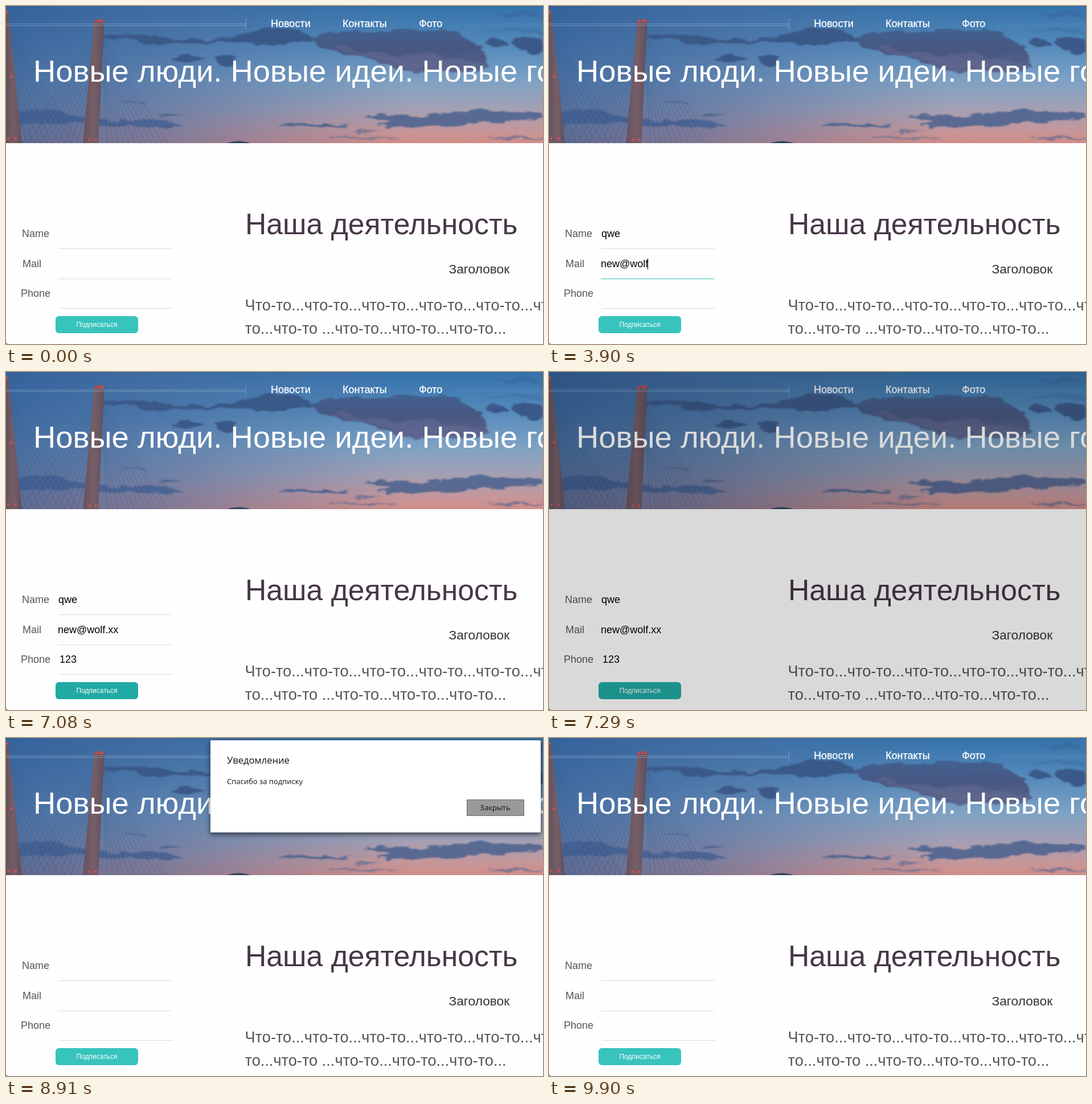
Animation of 943x594 px, one loop 9.93 s. Source, as an HTML page:

```html
<!DOCTYPE html>
<html lang="ru">
<head>
<meta charset="utf-8">
<title>Подписка</title>
<style>
  html, body { margin: 0; width: 100%; height: 100%; overflow: hidden; background: #fefefe; }
  svg { display: block; }
  text { font-family: "Liberation Sans", Arial, sans-serif; white-space: pre; }
  .nav { font-size: 18px; fill: #fff; stroke: #fff; stroke-width: .3; }
  .form { font-size: 18px; fill: #555; }
  .form .value { fill: #000; }
  .copy { font-size: 27.2px; fill: #555; }
  #dialog text { font-family: "Open Sans", "Noto Sans", sans-serif; font-size: 13px; fill: #111; }
  #dialog .title { font-size: 16.6px; }
</style>
</head>
<body>
<svg width="943" height="594" viewBox="0 0 943 594">
  <defs>
    <linearGradient id="sky" x2="0" y2="1">
      <stop offset="0" stop-color="#3472ab"/>
      <stop offset=".3" stop-color="#568bbc"/>
      <stop offset=".55" stop-color="#7fa2c4"/>
      <stop offset=".75" stop-color="#a3a0b4"/>
      <stop offset=".9" stop-color="#c4979c"/>
      <stop offset="1" stop-color="#d28d86"/>
    </linearGradient>
    <linearGradient id="dusk">
      <stop offset="0" stop-color="#345d95" stop-opacity=".75"/>
      <stop offset=".3" stop-color="#45679b" stop-opacity=".55"/>
      <stop offset=".75" stop-color="#506f9f" stop-opacity="0"/>
    </linearGradient>
    <linearGradient id="mass" x2="0" y2="1">
      <stop offset="0" stop-color="#42608f"/>
      <stop offset=".5" stop-color="#475781"/>
      <stop offset="1" stop-color="#5d678f"/>
    </linearGradient>
    <linearGradient id="stone">
      <stop offset="0" stop-color="#65525f"/>
      <stop offset=".5" stop-color="#765e66"/>
      <stop offset="1" stop-color="#5d4f5f"/>
    </linearGradient>
    <filter id="ragged" filterUnits="userSpaceOnUse" x="0" y="0" width="943" height="241" color-interpolation-filters="sRGB">
      <feTurbulence type="fractalNoise" baseFrequency=".03 .08" numOctaves="4" seed="5"/>
      <feDisplacementMap in="SourceGraphic" scale="15" xChannelSelector="R" yChannelSelector="G"/>
      <feGaussianBlur stdDeviation="1.8 1.2"/>
    </filter>
    <filter id="shadow" x="-10%" y="-10%" width="120%" height="130%">
      <feDropShadow dx="0" dy="3" stdDeviation="5" flood-opacity=".65"/>
    </filter>
    <clipPath id="banner"><rect width="943" height="241"/></clipPath>
  </defs>

  <rect width="943" height="594" fill="#fefefe"/>

  <g clip-path="url(#banner)">
    <rect width="943" height="241" fill="url(#sky)"/>
    <rect width="943" height="241" fill="url(#dusk)"/>
    <g filter="url(#ragged)">
      <g fill="#3b5988">
        <path d="M170 53Q220 47 280 55T370 57Q410 48 440 42T500 40Q530 48 545 60Q500 70 440 66T300 68Q220 64 170 53Z"/>
        <path d="M288 92Q318 81 346 92Q320 100 288 92ZM364 91Q382 79 402 89Q404 102 388 105Q372 102 364 91Z"/>
        <path d="M840 65Q858 51 882 66Q864 78 840 65ZM886 62Q914 49 943 57V82Q914 90 886 62Z"/>
        <path d="M860 12Q900 8 943 16V21Q900 20 860 12ZM840 42Q890 38 943 45V48Q890 48 840 42Z" opacity=".3"/>
      </g>
      <path fill="url(#mass)" d="M535 58Q550 42 580 48Q610 36 645 46Q690 36 730 43Q795 38 816 62Q848 78 846 98Q856 110 838 112Q790 118 740 115Q700 120 672 104Q640 92 610 86Q565 84 535 58Z"/>
      <path fill="#6b6e93" opacity=".4" d="M570 74Q600 66 625 82Q660 72 690 88Q740 76 768 94Q800 88 836 108Q760 106 700 106Q650 92 570 74Z"/>
      <g fill="#4f648f">
        <path d="M20 186Q70 178 130 191T250 200Q290 203 312 210Q250 216 170 209T20 211Z" fill="#3d5d91" opacity=".75"/>
        <path d="M200 169Q225 166 253 170Q225 173 200 169ZM264 192Q285 189 308 193Q285 196 264 192Z"/>
        <path d="M478 208Q520 202 570 208T640 207Q615 213 560 212T478 208Z"/>
        <path d="M625 194Q665 187 710 193Q760 191 800 185Q840 179 880 186Q920 188 943 187V198Q900 203 850 204Q790 213 730 211Q690 216 650 210Q700 202 625 194Z" opacity=".9"/>
        <path d="M558 231Q620 227 692 232Q620 235 558 231ZM600 221Q632 218 662 222Q630 225 600 221ZM840 232Q890 228 943 231V234Q890 236 840 232Z" opacity=".6"/>
      </g>
    </g>
    <path d="M388 241Q408 234 430 241Z" fill="#33415f"/>
    <g id="cables" stroke="#293a63" stroke-opacity=".3" stroke-width=".8"></g>
    <path d="M0 8H4L28 241H0Z" fill="url(#stone)"/>
    <path d="M155 26H173L162 241H135Z" fill="url(#stone)"/>
    <path d="M154 26Q164 20 174 26V31H154Z" fill="#6c5666"/>
    <g id="lamps" fill="#ff4a55"></g>
    <g stroke="#c9dcf0" fill="none">
      <path d="M0 31.5H421M0 34.5H421M421.5 23V41" stroke-opacity=".38"/>
      <path d="M792.5 23V41M793 31.5H943M793 34.5H943" stroke-opacity=".1"/>
    </g>
    <g class="nav">
      <text x="465" y="37">Новости</text>
      <text x="591" y="37">Контакты</text>
      <text x="725" y="37">Фото</text>
    </g>
    <text x="48" y="133" font-size="54.4" fill="#fff">Новые люди. Новые идеи. Новые города</text>
  </g>

  <text x="420" y="400.5" font-size="51.7" fill="#463746">Наша деятельность</text>
  <text x="777.5" y="470" font-size="22.7" fill="#333">Заголовок</text>
  <g class="copy">
    <text x="419.5" y="535">Что-то...что-то...что-то...что-то...что-то...что-то...</text>
    <text x="419.5" y="576">то...что-то ...что-то...что-то...что-то...</text>
  </g>

  <g class="form" id="form"></g>
  <rect id="submit" x="87" y="545" width="145" height="30" rx="6"/>
  <text x="123.5" y="564" font-size="12" fill="#fff">Подписаться</text>
  <path d="M0 590Q1 593 4 594H0Z" fill="#999"/>

  <rect id="dim" width="943" height="594"/>

  <g id="dialog">
    <rect x="359" y="4" width="580" height="162" rx="2" fill="#fff" filter="url(#shadow)"/>
    <text class="title" x="388" y="45">Уведомление</text>
    <text x="388" y="81">Спасибо за подписку</text>
    <rect id="close" x="809.5" y="108.5" width="100" height="28" stroke="#111" stroke-dasharray="1 1"/>
    <text x="859" y="127" text-anchor="middle">Закрыть</text>
  </g>
</svg>

<script>
const LOOP = 9930, RESET = 8850, DIM_START = 7290;
const TEAL = '#38c3bd';
const $ = id => document.getElementById(id);

function add(parent, tag, attrs, text = '') {
  const node = document.createElementNS(parent.namespaceURI, tag);
  for (const key in attrs) node.setAttribute(key, attrs[key]);
  node.textContent = text;
  return parent.appendChild(node);
}

// Bridge stays fan out from each pylon.
function fan(count, fromX, topY, stepY, nearX, farX) {
  for (let i = 0; i < count; i++) {
    const x2 = farX + (nearX - farX) * i / (count - 1);
    add($('cables'), 'line', { x1: fromX, y1: topY + i * stepY, x2, y2: 241 });
  }
}
fan(12, 171, 56, 7, 178, 284);
fan(10, 155, 52, 8, 125, 28);
fan(9, 5, 42, 10, 36, 128);

for (const [cx, cy] of [[158, 27], [164, 25], [169, 27], [147, 235], [158, 235], [4, 233], [17, 233], [9, 124], [1, 10], [163, 132]]) {
  add($('lamps'), 'circle', { cx, cy, r: 3, opacity: .25 });
  add($('lamps'), 'circle', { cx, cy, r: 1.3 });
}

const fields = [
  { label: 'Name', labelX: 28, x: 92, y: 406, lineX: 92, lineEnd: 291, lineY: 426, value: 'qwe',
    keys: [1170, 1290, 1380], focus: [480, 1950], blinks: [[1020, 1170], [1890, 1950]] },
  { label: 'Mail', labelX: 29, x: 91, y: 459, lineX: 91, lineEnd: 290, lineY: 479, value: 'new@wolf.xx',
    keys: [2250, 2340, 2400, 2910, 3540, 3630, 3720, 3900, 4080, 4320, 4410],
    focus: [1950, 4830], blinks: [[3450, 3540]] },
  { label: 'Phone', labelX: 26, x: 94, y: 511, lineX: 93, lineEnd: 293, lineY: 531, value: '123',
    keys: [5220, 5340, 5460], focus: [4830, 7080], blinks: [[5970, 6480], [7020, 7080]] }
];

for (const f of fields) {
  const form = $('form');
  add(form, 'text', { x: f.labelX, y: f.y }, f.label);
  f.text = add(form, 'text', { x: f.x, y: f.y, class: 'value' });
  f.line = add(form, 'rect', { x: f.lineX, y: f.lineY, width: f.lineEnd - f.lineX, height: 1 });
  f.caret = add(form, 'rect', { y: f.y - 15, width: 1, height: 19, fill: '#000' });
}

const within = (t, [start, end]) => t >= start && t < end;
const ramp = (t, start, end) => Math.min(1, Math.max(0, (t - start) / (end - start)));

function drawField(f, t) {
  const count = t < RESET ? f.keys.filter(key => t >= key).length : 0;
  const typed = f.value.slice(0, count);
  if (f.text.textContent !== typed) f.text.textContent = typed;
  const focused = within(t, f.focus);
  const caretOn = focused && !f.blinks.some(span => within(t, span));
  const width = typed ? f.text.getComputedTextLength() : 0;
  f.caret.setAttribute('x', Math.floor(f.x + width - (typed ? .9 : 0)));
  f.caret.setAttribute('opacity', caretOn ? 1 : 0);
  f.line.setAttribute('fill', focused ? TEAL : '#ddd');
  f.line.setAttribute('opacity', within(t, [DIM_START, RESET]) ? 0 : 1);
}

function draw(t) {
  for (const f of fields) drawField(f, t);
  $('submit').setAttribute('fill', within(t, [6630, RESET]) ? '#21aaa4' : TEAL);
  $('dim').setAttribute('opacity', t < DIM_START ? 0 : .145 * (1 - ramp(t, RESET - 30, 8910)));
  $('dialog').setAttribute('opacity', ramp(t, DIM_START, 7440) * (1 - ramp(t, 8930, 9090)));
  $('close').setAttribute('fill', t >= 8220 ? '#999' : '#ccc');
}

const origin = performance.now();
function tick() {
  draw((performance.now() - origin) % LOOP);
  requestAnimationFrame(tick);
}
tick();
</script>
</body>
</html>
```
